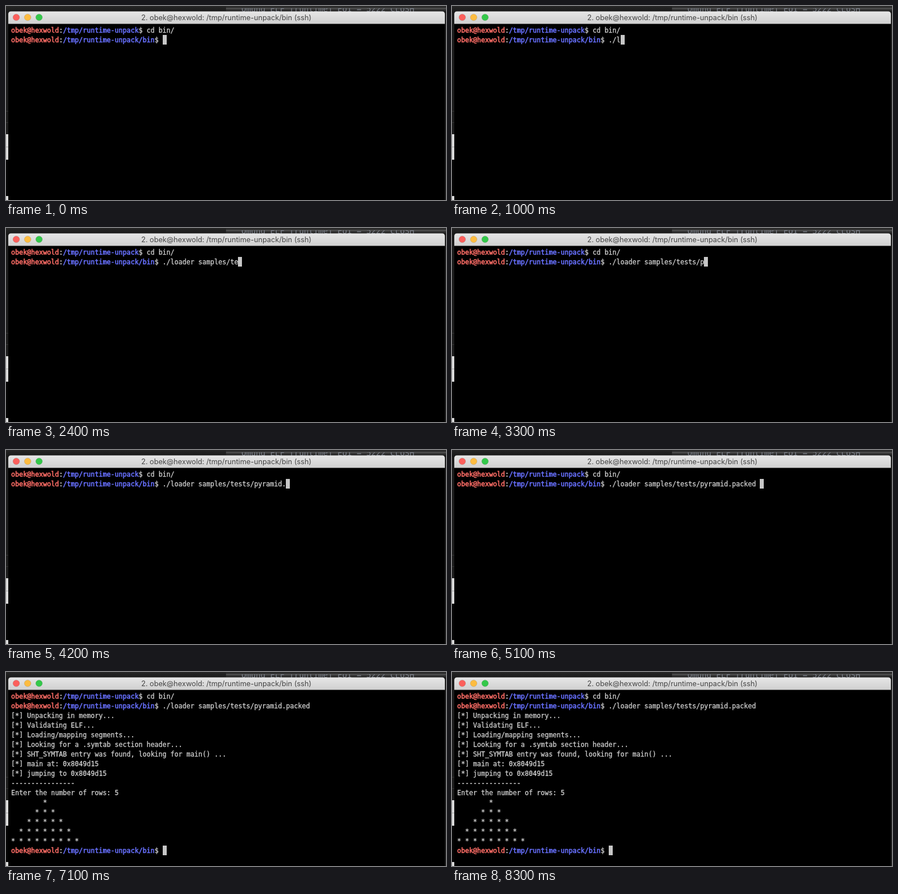
Animation of 772 by 342 pixels, one loop 8400 ms. Source, as an HTML page:

```html
<!DOCTYPE html>
<html lang="en">
<head>
<meta charset="utf-8">
<title>Terminal session</title>
<style>
  html, body { margin: 0; width: 100%; height: 100%; overflow: hidden; background: #1e1e1e; }
  svg { position: absolute; left: 0; top: 0; }
  .title { font: 12.7px Inter, sans-serif; fill: #454545; }
  .behind { font: 14px "DejaVu Sans Mono", monospace; fill: #7d828c; }
  pre {
    position: absolute; left: 9px; top: 35px; margin: 0;
    font: 11.627px/17px "DejaVu Sans Mono", monospace;
    color: #d2d2d2; -webkit-text-stroke: .3px;
  }
  .user, .path { -webkit-text-stroke: .6px; }
  .user { color: #ff6e67; }
  .path { color: #6871ff; }
  .cursor {
    display: inline-block; position: relative; top: -1px;
    width: 7px; height: 17px; background: #c7c7c7; vertical-align: top;
  }
</style>
</head>
<body>
<svg width="772" height="342">
  <defs>
    <linearGradient id="bar" x2="0" y2="1">
      <stop stop-color="#e6e6e6"/><stop offset="1" stop-color="#d0d0d0"/>
    </linearGradient>
    <linearGradient id="desk" x2="0" y2="1">
      <stop stop-color="#262626"/><stop offset="1" stop-color="#171717"/>
    </linearGradient>
    <clipPath id="gap"><path d="M386 4H772V10H386Z"/></clipPath>
  </defs>
  <!-- windows behind the terminal -->
  <path fill="url(#desk)" d="M0 0H772V12H0Z"/>
  <path fill="#2b2b2b" d="M386 0H772V9H386Z"/>
  <path fill="#484848" d="M386 3H772V6H386Z"/>
  <text class="behind" x="413" y="10" clip-path="url(#gap)">Qmund ELF [runtime] EUI = 5222 CLUSH</text>
  <path fill="#1c1c1c" d="M0 12H4V226H0Z"/>
  <path fill="#333" d="M0 185H4V186H0ZM0 205H4V206H0Z"/>
  <path fill="#dcdcdc" d="M0 226H4V271H0ZM0 335H4V342H0Z"/>
  <path fill="#aaa" d="M0 248H4V249H0Z"/>
  <path fill="#050505" d="M0 271H4V335H0Z"/>
  <!-- terminal window -->
  <path d="M4 31H770V342H4Z"/>
  <path fill="url(#bar)" d="M4 31.5V14.5Q4 9.5 9 9.5H765Q770 9.5 770 14.5V31.5Z"/>
  <g stroke="#0003" stroke-width=".6">
    <circle cx="18" cy="20" r="5.8" fill="#fc605c"/>
    <circle cx="38" cy="20" r="5.8" fill="#fdbc40"/>
    <circle cx="58" cy="20" r="5.8" fill="#34c84a"/>
  </g>
  <text class="title" x="386.5" y="24.5" text-anchor="middle">2. obek@hexwold: /tmp/runtime-unpack/bin (ssh)</text>
</svg>
<pre id="term"></pre>
<script>
const LOOP = 8400, TICK = 100, RUN = 5200, ANSWER = 6600, DONE = 7100;

const prompt = dir =>
  `<span class="user">obek@hexwold</span>:<span class="path">/tmp/runtime-unpack${dir}</span>$ `;
const head = prompt("") + "cd bin/\n" + prompt("/bin");
const log = [
  "Unpacking in memory...",
  "Validating ELF...",
  "Loading/mapping segments...",
  "Looking for a .symtab section header...",
  "SHT_SYMTAB entry was found, looking for main() ...",
  "main at: 0x8049d15",
  "jumping to 0x8049d15"
].map(s => `[*] ${s}\n`).join("") + "-".repeat(16) + "\nEnter the number of rows: ";

// Typing bursts: start time, text, number of ticks it takes
const bursts = [
  [600, "./", 2],
  [1000, "loader sam", 8],
  [1900, "ples/", 3],
  [2400, "tests/", 4],
  [3100, "p", 1],
  [3600, "yramid.", 7],
  [4400, "packed ", 3]
];

function typed(t) {
  return bursts.map(([start, text, ticks]) => {
    const done = Math.floor((t - start) / TICK) + 1;
    return text.slice(0, Math.max(0, Math.round(text.length * done / ticks)));
  }).join("");
}

function pyramid(rows) {
  let out = "";
  for (let r = 1; r <= rows; r++)
    out += "  ".repeat(rows - r) + "* ".repeat(2 * r - 1) + "\n";
  return out;
}

function screen(t) {
  let out = head + typed(t);
  if (t >= RUN) out += "\n" + log;
  if (t >= ANSWER) out += "5";
  if (t >= DONE) out += "\n" + pyramid(5) + prompt("/bin");
  return out + '<span class="cursor"></span>';
}

const term = document.getElementById("term");
const start = performance.now();
let shown = "";
function frame() {
  const next = screen((performance.now() - start) % LOOP);
  if (next !== shown) term.innerHTML = shown = next;
  requestAnimationFrame(frame);
}
frame();
</script>
</body>
</html>
```
